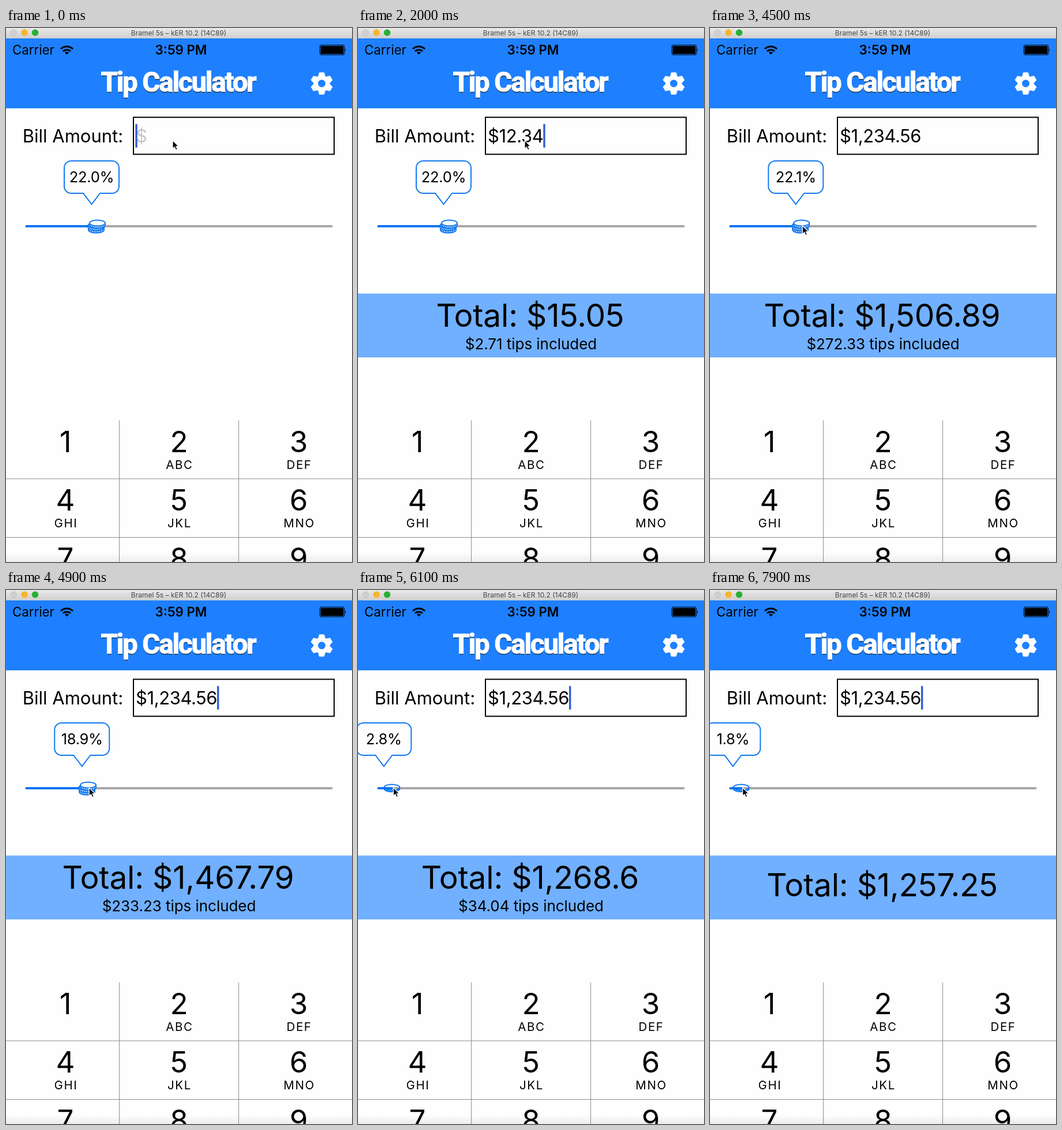
Recreate the animation shown at these times as an HTML page. Size 600 by 924 pixels, loop 8000 ms.

```html
<!DOCTYPE html>
<html lang="en">
<head>
<meta charset="utf-8">
<title>Tip Calculator</title>
<style>
  html, body { margin: 0; width: 100%; height: 100%; overflow: hidden; background: #fefefe; }
  svg { display: block; width: 600px; height: 924px; font-family: Inter, Roboto, sans-serif; }
  .mid { text-anchor: middle; }
  .title { font: 700 47.5px Roboto, "Open Sans", sans-serif; letter-spacing: -2.2px; }
  .field { font-size: 31px; letter-spacing: -.4px; }
  .coin { stroke: #0a74ee; stroke-width: 1.8; }
  .rim { fill: none; stroke-dasharray: 1.8 1.4; stroke-width: 2.2; }
</style>
</head>
<body>
<svg viewBox="0 0 600 924">
  <defs>
    <linearGradient id="bar" x2="0" y2="1">
      <stop stop-color="#e9e9e9"/><stop offset="1" stop-color="#cecece"/>
    </linearGradient>
    <linearGradient id="foot" x2="0" y2="1">
      <stop stop-color="#fefefe"/><stop offset="1" stop-color="#ececec"/>
    </linearGradient>
    <g id="coin">
      <path d="M-13.500 0v4a13.500 5 0 0 0 27 0v-4"/>
      <path class="rim" d="M-12 4.500a13.500 5 0 0 0 24 0"/>
      <ellipse rx="13.500" ry="5"/>
    </g>
  </defs>
  <rect width="600" height="924" fill="#fefefe"/>

  <!-- window bar -->
  <rect width="600" height="18" fill="url(#bar)"/>
  <circle cx="13" cy="8" r="5.2" fill="#d0d0d0" stroke="#b9b9b9" stroke-width=".8"/>
  <circle cx="32" cy="8" r="5.8" fill="#f8b42c"/>
  <circle cx="50.5" cy="8" r="5.8" fill="#27b034"/>
  <text class="mid" x="299.5" y="13" font-size="12" fill="#444">Bramel 5s – kER 10.2 (14C89)</text>

  <!-- header -->
  <rect y="18" width="600" height="121" fill="#1e80ff"/>
  <text x="11" y="46" font-size="22.3">Carrier</text>
  <g fill="none" stroke="#000" stroke-width="3">
    <path d="M95 36.2a15 15 0 0 1 21 0M99 40.3a9.3 9.3 0 0 1 13 0"/>
    <path d="M105.5 46l-3.6-3.6a5.1 5.1 0 0 1 7.2 0z" fill="#000" stroke="none"/>
  </g>
  <text class="mid" x="303.5" y="46" font-size="22.3" font-weight="600">3:59 PM</text>
  <rect x="544.5" y="29.5" width="42" height="17" rx="3" fill="none" stroke="#000" stroke-width="1.2"/>
  <rect x="546" y="31" width="39" height="14" rx="1.5"/>
  <path d="M588 35q2.4 3 0 6z"/>
  <g class="title mid">
    <text x="298.5" y="111.5" fill="#12345f">Tip Calculator</text>
    <text x="298.5" y="109.5" fill="#fff" stroke="#fff" stroke-width="1">Tip Calculator</text>
  </g>
  <g id="gear" transform="translate(547.5 96)" fill="#fff">
    <circle r="10.3" fill="none" stroke="#fff" stroke-width="7.6"/>
  </g>

  <!-- bill field -->
  <text x="28.8" y="198" font-size="31">Bill Amount:</text>
  <rect x="221" y="154.5" width="348" height="64" fill="#fefefe" stroke="#000" stroke-width="2"/>
  <text id="amount" class="field" x="225" y="198"></text>
  <rect id="caret" y="166" width="3.4" height="41" rx="1" fill="#2f5fd6"/>

  <!-- slider -->
  <g id="bubble">
    <path d="M-35.500 230h71a12 12 0 0 1 12 12v32a12 12 0 0 1-12 12h-21L0 305l-14.500-19h-21a12 12 0 0 1-12-12v-32a12 12 0 0 1 12-12z"
      fill="#fefefe" stroke="#127af0" stroke-width="2"/>
    <text id="percent" class="mid" y="267" font-size="25.500" letter-spacing="-.3"></text>
  </g>
  <g stroke-width="4" stroke-linecap="round">
    <path d="M35.500 343H564.500" stroke="#a8a8ab"/>
    <path id="filled" stroke="#0a74f2"/>
  </g>
  <g id="stack" class="coin" fill="#fefefe">
    <use href="#coin" x="-1" y="345.500"/>
    <use href="#coin" x="-1.500" y="341.500"/>
    <use href="#coin" x="1" y="337.500"/>
  </g>
  <g id="single" class="coin" fill="none">
    <ellipse cy="341.500" rx="13.500" ry="5"/>
    <path d="M-13.500 342v2a13.500 5 0 0 0 27 0v-2"/>
    <path class="rim" d="M-12 344a13.500 5 0 0 0 24 0"/>
  </g>

  <!-- result -->
  <g id="band">
    <rect y="459.500" width="600" height="110.500" fill="#70b0ff"/>
    <text id="total" class="mid" x="298.500" font-size="55" letter-spacing="-.2"></text>
    <text id="tips" class="mid" x="300" y="556" font-size="26" letter-spacing="-.05"></text>
  </g>

  <!-- keypad -->
  <rect y="908" width="600" height="16" fill="url(#foot)"/>
  <path d="M196.500 679V924M403.500 679V924M0 780H600M0 881.500H600" stroke="#8b8b8d"/>
  <g id="keys" class="mid"></g>

  <path id="mouse" d="M0 0V14.500L3.300 11.400L5.600 16.600L8.200 15.500L5.900 10.400H10.400Z" stroke="#fff" stroke-width="1.200"/>
</svg>
<script>
const $ = id => document.getElementById(id);
const LOOP = 8000, STEP = 100;
const keyTimes = [400, 700, 1100, 1600, 2100, 2600];
const rates = [[0, .22], [4400, .22], [4500, .22059], [5000, .181], [5400, .130516], [5900, .036],
  [6100, .027573], [6700, .003677], [7000, 0], [7600, 0], [7900, .018379]];

const clamp = v => Math.max(0, Math.min(1, v));
const ramp = (t, a, b) => clamp((t - a) / (b - a));
const ease = p => p * p * (3 - 2 * p);
const mix = (a, b, p) => a + (b - a) * p;
const money = (v, min) => "$" + v.toLocaleString("en-US", { minimumFractionDigits: min, maximumFractionDigits: 2 });
const move = (id, x, y = 0) => $(id).setAttribute("transform", `translate(${x} ${y})`);

function track(table, t) {
  const i = table.findIndex(row => row[0] > t);
  if (i < 0) return table[table.length - 1][1];
  const [a, b] = [table[i - 1], table[i]];
  return mix(a[1], b[1], ramp(t, a[0], b[0]));
}

function build() {
  const letters = ["", "ABC", "DEF", "GHI", "JKL", "MNO", "", "", ""];
  const centers = [103, 300, 507.5];
  $("keys").innerHTML = letters.map((s, i) => {
    const x = centers[i % 3], y = 734 + 101 * Math.floor(i / 3);
    return `<text x="${x}" y="${y}" font-size="51">${i + 1}</text>` +
      `<text x="${x + 1}" y="${y + 29}" font-size="20.5" letter-spacing="1.6">${s}</text>`;
  }).join("");
  for (let a = 0; a < 360; a += 60)
    $("gear").innerHTML += `<path d="M-6.500 -12L-4.300 -19.300H4.300L6.500 -12z" transform="rotate(${a})"/>`;
}

// The caret stays lit while typing, then blinks once a second.
function caretAlpha(t) {
  const p = t % 1000;
  if (t < 3300 || p < 300 || p >= 900) return 1;
  return p < 500 ? 1 - ramp(p, 250, 420) * .9 : p < 800 ? 0 : .6;
}

function draw(t) {
  const typed = keyTimes.filter(k => k <= t).length;
  const bill = Math.floor(123456 / 10 ** (6 - typed)) / 100;
  const rate = track(rates, t), pct = rate * 100;
  const tip = Math.round(bill * rate * 100) / 100;

  const field = $("amount");
  field.textContent = typed ? money(bill, 2) : "$";
  field.setAttribute("fill", typed ? "#000" : "#c4c4c9");
  $("caret").setAttribute("x", typed ? 225 + field.getComputedTextLength() : 224.3);
  $("caret").style.opacity = caretAlpha(t);

  const thumb = 44.6 + 5.13 * pct;
  $("percent").textContent = pct.toFixed(1) + "%";
  move("bubble", 29.9 + 5.39 * pct);
  move("stack", thumb);
  move("single", thumb);
  $("stack").style.display = pct >= 15 ? "" : "none";
  $("single").style.display = pct < 15 ? "" : "none";
  $("filled").setAttribute("d", `M35.5 343H${thumb}`);

  const hide = t < 7000 ? 1 - ramp(t, 600, 900) : ease(ramp(t, 6900, 7300));
  $("band").style.opacity = ramp(t, 300, 700);
  $("total").textContent = "Total: " + money(bill + tip, 0);
  $("total").setAttribute("y", mix(517, 530, hide));
  $("tips").textContent = money(tip, 0) + " tips included";
  $("tips").style.opacity = 1 - hide;

  const p = ease(ramp(t, 3200, 4100));
  move("mouse", mix(289, thumb + 2.6, p), mix(194.5, 342, p));
}

function tick() {
  draw(Math.floor(performance.now() % LOOP / STEP) * STEP);
  requestAnimationFrame(tick);
}

build();
tick();
</script>
</body>
</html>
```
